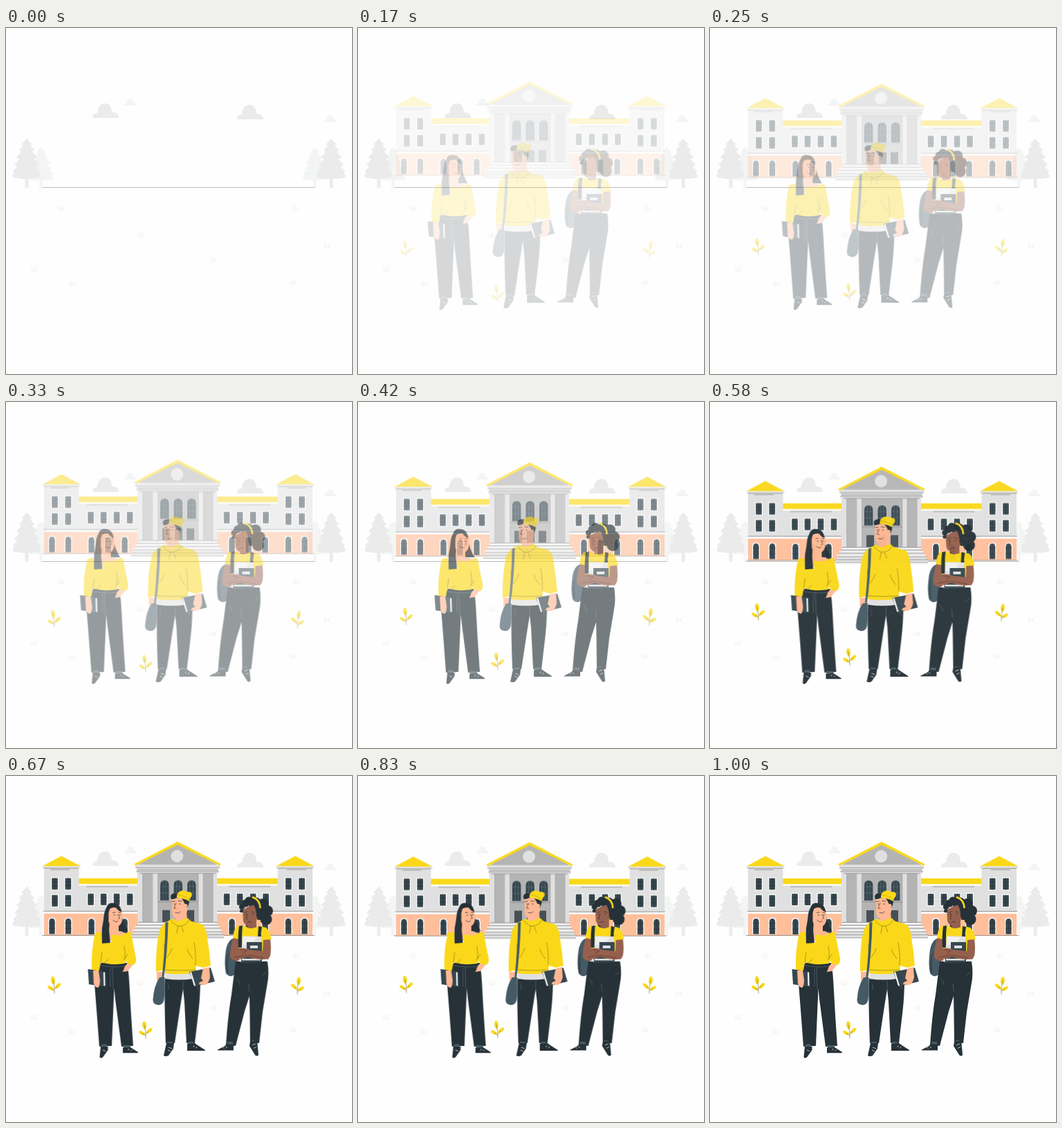
Recreate the animation shown at these times as an HTML page without scripts. Size 500 by 500 pixels, loop 1.04 s.

```html
<!DOCTYPE html>
<html lang="en">
<head>
<meta charset="utf-8">
<title>Campus</title>
<style>
html,body{margin:0;width:100%;height:100%;overflow:hidden;background:#fefefe}
svg{display:block;width:100vw;height:100vh}
.in{animation:enter 1040ms -4ms infinite}
.down{--x:0;--y:1}
.right{--x:1;--y:0}
.up{--x:0;--y:-1}
@keyframes enter{
  0%{opacity:0;transform:translate(0,0);animation-timing-function:step-end}
  8%{opacity:.04;transform:translate(calc(var(--x)*-20px),calc(var(--y)*-20px));animation-timing-function:steps(2)}
  16%{opacity:.19;transform:translate(calc(var(--x)*-17.8px),calc(var(--y)*-17.6px));animation-timing-function:steps(4)}
  32%{opacity:.48;transform:translate(calc(var(--x)*-11.6px),calc(var(--y)*-11.4px));animation-timing-function:steps(4)}
  48%{opacity:.8;transform:translate(calc(var(--x)*-4.2px),calc(var(--y)*-4.2px));animation-timing-function:steps(2)}
  56%{opacity:.96;transform:translate(calc(var(--x)*-1.6px),calc(var(--y)*-1.6px));animation-timing-function:steps(2)}
  64%{opacity:1;transform:translate(calc(var(--x)*-.2px),calc(var(--y)*-.2px));animation-timing-function:steps(4)}
  80%{opacity:1;transform:translate(calc(var(--x)*.7px),calc(var(--y)*.6px));animation-timing-function:steps(4)}
  96%,100%{opacity:1;transform:translate(0,0);animation-timing-function:step-end}
}
.y{fill:#fad819}
.d{fill:#263238}
.m{fill:#37474f}
.n{fill:#455a64}
.s{fill:#ffb893}
.b{fill:#96604e}
.w{fill:#fff}
.g1{fill:#e0e0e0}
.g2{fill:#c7c7c7}
.g3{fill:#b4b4b4}
.p{fill:#ffbf9b}
.l{fill:none;stroke:#263238;stroke-width:.7;stroke-linecap:round}
.k{fill:none;stroke:#7d6b16;stroke-width:.6;stroke-linecap:round}
.c{fill:none;stroke:#8a8a8a;stroke-width:.8}
.seam{fill:none;stroke:#62717a;stroke-width:.6;stroke-linecap:round}
.lace{fill:none;stroke:#fff;stroke-width:.7}
</style>
</head>
<body>
<svg viewBox="0 0 500 500">
<defs>
  <path id="half" d="M0 0l8 9-3 1 7 8-4 1 8 9-5 2 8 9-5 2 7 7-2 2 3 5q-2 4-9 3-6 2-13 0z"/>
  <g id="tree">
    <use href="#half"/><use href="#half" transform="scale(-1 1)"/>
    <rect x="-2.7" y="55" width="5.4" height="17"/>
  </g>
  <path id="cloud" d="M0 21q0-7 7-7 1-14 11-14 9 0 10 13 9-1 10 8z"/>
  <path id="puff" d="M0 10q1-4 4-4 1-6 5-6 4 0 5 6 4 0 4 4z"/>
  <path id="grass" d="M-2 4q0-4-3-5M0 4q1-5-1-8M3 4q0-5 2-7" fill="none" stroke="#ebebeb" stroke-width=".9"/>
  <g id="win">
    <rect class="w" width="11" height="19"/>
    <rect class="m" x="1.200" y="1.200" width="8.600" height="16.600"/>
    <path d="M5.500 1v17M1 6.500h9M1 12h9" fill="none" stroke="#263238" stroke-width=".6"/>
  </g>
  <g id="arch">
    <path class="w" d="M0 24V6q0-6 5.500-6T11 6v18z"/>
    <path class="m" d="M1.300 24V6.500q0-5 4.200-5t4.200 5V24z"/>
    <path d="M5.500 2v22M1 8h9M1 16h9" fill="none" stroke="#263238" stroke-width=".6"/>
  </g>
  <g id="tall">
    <path class="m" d="M0 29V7q0-7 6.200-7t6.200 7v22z"/>
    <path d="M4.200 1v28M8.300 1v28M0 9h12.400M0 18h12.400" fill="none" stroke="#6b7a81" stroke-width=".5"/>
  </g>
  <g id="side">
    <rect class="g1" x="105" y="157" width="91" height="44"/>
    <path class="y" d="M105 148h91v8.500h-91z"/>
    <path class="w" d="M105 156.500h91v2h-91z"/>
    <path class="c" d="M116 160h60M106 195.500h88"/>
    <rect class="p" x="105" y="199" width="91" height="31.500"/>
    <path class="w" d="M105 197h91v2h-91z"/>
    <use href="#win" x="117" y="169"/><use href="#win" x="135.500" y="169"/>
    <use href="#win" x="154.500" y="169"/><use href="#win" x="173.500" y="169"/>
    <use href="#arch" x="118" y="205"/><use href="#arch" x="142" y="205"/><use href="#arch" x="166" y="205"/>
    <rect class="g1" x="55" y="131" width="50.500" height="68"/>
    <path class="y" d="M52.500 130.500 80 115.800l28 14.700z"/>
    <path class="g1" d="M53 130.500h54.500v3H53z"/>
    <path class="c" d="M55 133.500h50M64 135.500h28"/>
    <use href="#win" x="65" y="146.500"/><use href="#win" x="84.300" y="146.500"/>
    <use href="#win" x="65" y="171"/><use href="#win" x="84.300" y="171"/>
    <path class="c" d="M54 195.500h52"/>
    <rect class="p" x="55" y="199" width="50.500" height="31.500"/>
    <path class="w" d="M53 196.500h53v2.500H53z"/>
    <use href="#arch" x="61" y="204.500"/><use href="#arch" x="84.500" y="204.500"/>
    <path class="c" d="M53 230.500h143"/>
  </g>
  <g id="plant">
    <ellipse class="y" cx="-1.500" cy="-19" rx="2.900" ry="5.800" transform="rotate(-6 -1.500 -19)"/>
    <ellipse class="y" cx="-5" cy="-7.800" rx="4.800" ry="2.300" transform="rotate(30 -5 -7.800)"/>
    <ellipse class="y" cx="5.500" cy="-11" rx="5.200" ry="2.300" transform="rotate(-42 5.500 -11)"/>
    <path class="k" d="M-1.500-19Q1-9 .5 0M.3-4l-4-3M.3-6l4-4"/>
  </g>
</defs>

<g fill="#f3f5f5">
  <use href="#tree" transform="translate(50.500 172)scale(.82)"/>
  <use href="#tree" transform="translate(446.500 172)scale(.82)"/>
  <use href="#puff" x="171" y="102"/><use href="#puff" x="459.500" y="126"/>
</g>
<g fill="#ebebeb">
  <use href="#tree" transform="translate(30 159.500)scale(.95 .99)"/>
  <use href="#tree" transform="translate(470 159.500)scale(.95 .99)"/>
  <use href="#cloud" x="125" y="109"/><use href="#cloud" x="334" y="111"/>
</g>
<use href="#grass" x="79" y="260"/><use href="#grass" x="418" y="260"/>
<use href="#grass" x="194" y="299"/><use href="#grass" x="463" y="314"/>
<use href="#grass" x="299" y="334"/><use href="#grass" x="40" y="348"/>
<use href="#grass" x="95" y="369"/><use href="#grass" x="414" y="367"/>
<path d="M52 230.500h394" stroke="#bdbdbd"/>

<g class="in down">
  <use href="#side"/>
  <use href="#side" transform="matrix(-1 0 0 1 498 0)"/>
  <rect class="g1" x="190" y="139" width="115" height="73"/>
  <path class="g3" d="M197.500 141h14v70h-14zM219.500 141h58.500v70h-58.500zM285 141h14v70h-14z"/>
  <path class="c" d="M197.500 141v70M212 141v70M219.500 141v70M278 141v70M285 141v70M299 141v70" opacity=".5"/>
  <use href="#tall" x="223" y="151"/><use href="#tall" x="242.500" y="151"/><use href="#tall" x="262" y="151"/>
  <path fill="#9a9a9a" d="M220 181h58v1.500h-58z"/>
  <path fill="#455056" d="M226 194h11v17h-11zM244 194h11v17h-11zM261 194h11v17h-11z"/>
  <path class="g1" d="M187 129h122v4H187zM189 133h118v8H189z"/>
  <path class="c" d="M187 132.800h122M190 135.800h116M188 138h120M193 140.800h110"/>
  <path class="g3" d="M190 128.500 248 98l58 30.500z"/>
  <path class="y" d="M185 127.500 248 95l63 32.500-2.500 2L248 99.500 187.500 129.500z"/>
  <circle class="g1" cx="247.200" cy="116" r="9"/>
  <path class="g1" d="M192 211h112v4h3v5h3v5h3v5h2v4H181v-4h2v-5h3v-5h3v-5h3z"/>
  <path class="c" d="M191 211.500h114M189 215.500h118M186 220h124M184 225h129M182 229.500h133M181 233.800h134"/>
  <path class="w" d="M190 213h116v1.500H190zM186 217.500h123v1.500H186zM183 222.500h129v1.500H183z"/>
</g>

<g class="in up">
  <use href="#plant" x="69.500" y="314"/>
  <use href="#plant" x="201.500" y="379"/>
  <use href="#plant" transform="matrix(-1 0 0 1 421.500 315)"/>
</g>

<g class="in right">
  <!-- woman with long hair -->
  <g>
    <path class="d" d="M152 183.500q13-1 14.500 12 2 17 10 29l-16 0-18-8 2-22q1-10 7.500-11z"/>
    <path class="s" d="M150 208l-1 17-12 4 14 9 17-1 9-9-14-4v-10z"/>
    <path class="s" d="M147 194q8-7 18-2 4 8 3 17-2 9-10 9-9-1-11-12z"/>
    <path class="d" d="M158 184q-8 4-9.500 14l0 18 2.500 27-13 .5 1-24q2-10 3-20 2-14 16-15.500z"/>
    <path class="d" d="M156 184q9 0 11.500 13-8-3-11.500-13z"/>
    <path class="l" d="M154.500 197.500l3.500-.5M163 197l3 1M162 200q1 3 2.500 5.500l-2 1M155 208.500q4 4 7 1"/>
    <circle class="d" cx="157" cy="201" r=".8"/><circle class="d" cx="164.500" cy="201" r=".8"/>
    <path class="d" d="M138 270l37 0q3 16 3.500 31 2 40 5.500 89l-17 1-9-69-1.500-15-3.500 83-18 1q-4-55-7-91 1-20 10-30z"/>
    <path class="seam" d="M154 276l1 32M137 274q17 3 38 1M151 278v26M168 283q5 0 8-3"/>
    <path class="s" d="M178 268l7 3-9 11-7 1 3-8z"/>
    <path class="y" d="M129 227l9-2 1 17 13-1v-12q15 4 25-4l4 2q3 18 7 36 1 6-3 10l-9-2-2-4-2 4q-20 3-35-2l-2 12-11 0q-1-30 5-54z"/>
    <path class="k" d="M137 270l2-15M172 264q1-9-1-18M170 266l6-8M141 272l7-7"/>
    <path class="m" d="M118.500 279l26 4 .5 22-25-4z"/>
    <path class="w" d="M141 283.500l2 .3.500 19.500-2-.3z"/>
    <path class="s" d="M126 281l8 0 2 14q0 9-3 11-5-1-6-6z"/>
    <path class="n" d="M138 388l7-1v6l-8 1zM169 389h11v5h-10z"/>
    <path class="d" d="M137 391h10.500l0 5-7 10q-4 3-5 0zM169 393l11-1 11 7v1.200h-22z"/>
    <path class="lace" d="M140 396l4 1.500M178 394l-1.500 2.500M182 395.500l-1.500 2"/>
  </g>

  <!-- man with beanie -->
  <g>
    <path class="s" d="M245 196l-1 15 8 6 10-6-1-18z"/>
    <path class="s" d="M240 177l20-2q4 10 2 20-3 12-12 12-9 0-10-12z"/>
    <path class="d" d="M239 178q-3-7 4-8.500l7 0 5 6-8 0q-4 3-8 2.500zM254 177l11 2q0 7-3 11l-3-1q0-6-5-12z"/>
    <path class="s" d="M257 186q3-3 5 0t-3 5z"/>
    <path class="y" d="M247 173q1-7 9-7.500 4 0 6 2 6-1 7 3.500 0 3-2.500 5l-2 5q-8-5-17.500-5z"/>
    <path class="k" d="M248 172q9 0 17 6" opacity=".5"/>
    <path class="l" d="M240.500 181.500l4-.5M249 180.500l5 .5M246 184q-2 4-3 7l3 .500M245 197.500q4 2 7-1"/>
    <circle class="d" cx="243.500" cy="185" r=".8"/><circle class="d" cx="251.500" cy="185" r=".8"/>
    <path class="s" d="M218 283h9l2 10q-2 8-6 7-6-3-5-10z"/>
    <path class="d" d="M229.500 291l51.500 0q0 26-2.500 48l-5.500 47-12 0-3-60-2-18-4 25-8 53-13 0q-2-50-1.500-95z"/>
    <path class="seam" d="M256 296l0 13M234 300q3 6 0 9M278 299q-3 5-1 9"/>
    <path class="g1" d="M230 282h41v11q-20 3-41 0z"/>
    <path class="y" d="M241 206l8 4 13-5 6 5 15 4q5 3 7 13 4 24 6 47l-11 3-10-3-1 10q-21 4-44 1l-1-5-12 3q-1-34 5-60 3-8 10-12z"/>
    <path class="k" d="M239 209q7 9 13 8 9-1 13-9M249 217l-2 10M254 218l3 8M230 276l-1-33M274 273q1-17-2-32M233 262q6-8 7-13M270 264q-7-9-8-14M230 280q20 2 44 0"/>
    <path class="n" d="M230.500 212l4-1q-1 44-6.500 83l-3 1q5-42 5.500-83z"/>
    <path class="n" d="M222 291h7q1 20-.5 33-2 7-8 7-8-1-8-7 1-20 9.500-33z"/>
    <path class="m" d="M265 283l31-6 6 20-29 7z"/>
    <path class="w" d="M266 283.500l2-.5 6 20-2 .500z"/>
    <path class="s" d="M285 278l9-2 1 15q-3 12-9 11l-7-1 1-3 5-2-3-4z"/>
    <path class="n" d="M233 384h8v6h-9zM263 384h8v6h-8z"/>
    <path class="d" d="M232 386h11l-1 8-7 10q-4 2-7 0zM262 387l11-1 4 3 11 7v1h-26z"/>
    <path class="lace" d="M235 392l5 2M234 396l4 2M272 389.500l-1 2.500M276 391l-1.500 2.500"/>
  </g>

  <!-- woman with curly hair -->
  <g>
    <path class="n" d="M332 234q-11 1-14 17-3 20 0 34 3 5 9 4l8-5z"/>
    <path class="d" d="M322 254q-3 15 0 31l-3-1q-3-18 3-30z" opacity=".5"/>
    <g class="d">
      <circle cx="372" cy="185" r="8"/><circle cx="378" cy="195" r="8"/>
      <circle cx="376" cy="207" r="8.500"/><circle cx="366" cy="197" r="11"/>
      <circle cx="361" cy="184" r="8.500"/><circle cx="351" cy="180" r="5.500"/>
    </g>
    <path class="b" d="M350 205v13l-6 4 8 14 13-1 6-13-9-4v-12z"/>
    <path class="b" d="M342 193q8-3 13-8 8 3 9 12 0 19-11 20-8 0-10-8z"/>
    <g class="d">
      <circle cx="346" cy="184" r="5.500"/><circle cx="341" cy="189" r="4"/>
      <circle cx="340.500" cy="195" r="2.500"/><circle cx="353" cy="183" r="5"/>
    </g>
    <path class="d" d="M356 182l8 2q7 8 3 19l-5 1q1-11-6-22z"/>
    <path d="M356 175q11 3 11.500 16" fill="none" stroke="#fad819" stroke-width="2.500"/>
    <path class="l" d="M345 197.500l4-1.500M355 196l4 1M349 200l-2 6 2 1M349 211.500q3-1.500 6-.5"/>
    <circle class="d" cx="347.500" cy="200" r=".8"/><circle class="d" cx="356.500" cy="200" r=".8"/>
    <path fill="none" stroke="#fad819" stroke-width=".9" d="M363 207v3M342 203v3"/>
    <path class="d" d="M332 268h46q3 18-.5 34l-6.500 39-5 45-13-1-.5-42-.5-25-7 22-13 50-14-1q3-44 8-73z"/>
    <path class="seam" d="M352 311l-1-11M333 293q4 2 5 9M371 288l5-4"/>
    <path class="b" d="M329 233l11 2-2 11-1 21q-10 1-13-5 0-16 5-29zM370 236l12-1q2 15 0 25l-3 5-13-2z"/>
    <path class="y" d="M334 217l11-1q8 8 20 1l11 2q5 4 8 17l-12 1-1 17h-35l1-18-9-2q1-12 6-17z"/>
    <path class="d" d="M337 217l5-1q-2 20 0 32h-6q-1-17 1-31zM365 217l5 1q-2 9-1 17l-5-1z"/>
    <path class="g1" d="M342 231l27 1 1 36-31 1z"/>
    <path fill="#f0f0f0" d="M343 232l20 1-9 12-12-1z"/>
    <path class="m" d="M348 240h22v29l-30 1v-9h8z"/>
    <path class="g1" d="M341 264h27v2.500h-27zM353 245h11v4h-11z"/>
    <path class="b" d="M326 252q15-6 26-1l25 3 5 5q-2 6-10 6-14 0-22-4-14 6-23 3-5-3-1-12z"/>
    <path d="M330 262q12-2 20-3l23 4M339 251l9 2-6 4" fill="none" stroke="#653b2e" stroke-width=".8"/>
    <path class="n" d="M320 384h8v6h-8zM355 382h8v7h-8z"/>
    <path class="d" d="M319 387l10 1v8.500h-23v-1q6-3 10-5zM353 384l10-2 1 10 1 11q-2 3-5 0l-8-13z"/>
    <path class="lace" d="M318 390.500l1.500 2.500M314 392l1.500 2M356 389l5-2M358 393.500l4-2"/>
  </g>
</g>
</svg>
</body>
</html>
```
